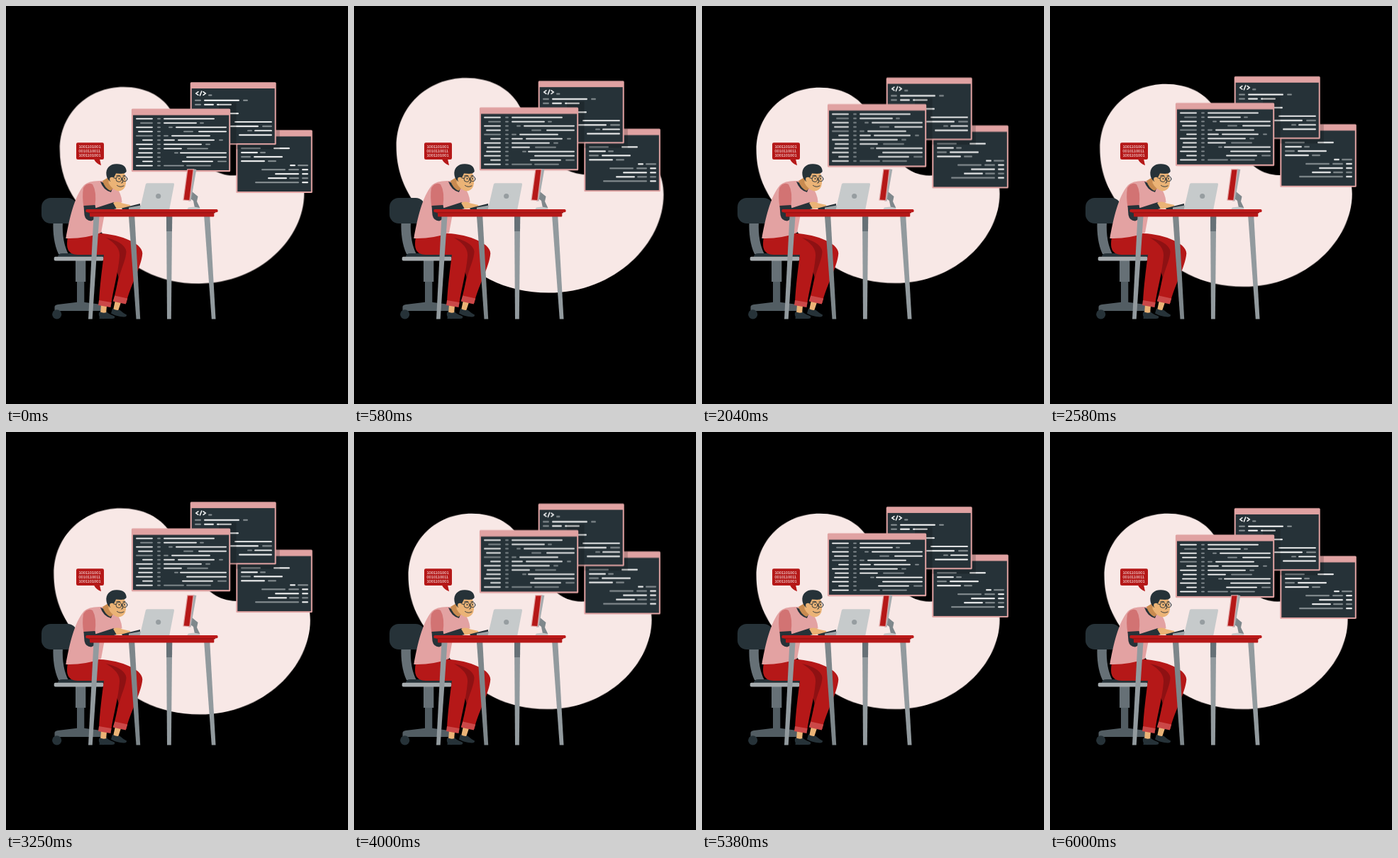
Write an HTML page without scripts that moves like this. It is 482x560 px and loops after 6040 ms.

```html
<!DOCTYPE html>
<html lang="en">
<head>
<meta charset="utf-8">
<title>Coder at a desk</title>
<style>
  html, body { margin: 0; width: 100%; height: 100%; overflow: hidden; background: #000; }
  svg { display: block; width: 482px; height: 560px; }

  .blob { fill: #f8e8e6; transform-origin: 248px 252.2px; animation: pulse 6.04s linear infinite; }
  .windows { animation: float 6.04s linear infinite; }

  .frame { fill: #e0a2a2; }
  .pane { fill: #263238; }
  .shade { fill: #000; opacity: .18; }
  .code { fill: none; stroke-width: 1.9; stroke-linecap: round; }
  .hi { stroke: #fff; }
  .lo { stroke: #8c9497; }

  .dark { fill: #263238; }
  .red { fill: #b51818; }
  .deep { fill: #8e1113; }
  .cuff { fill: #cb4848; }
  .shirt { fill: #e3a2a2; }
  .sleeve { fill: #d27373; }
  .skin { fill: #ebb376; }
  .steel { fill: #929a9e; }
  .iron { fill: #667076; }
  .line { fill: none; stroke: #263238; stroke-width: .9; stroke-linecap: round; }
  .bits { fill: #fff; font: 5.7px "Liberation Sans", Arial, sans-serif; }

  @keyframes float {
    0%, 100% { transform: translateY(0); }
    50% { transform: translateY(-9.64px); }
  }
  @keyframes pulse {
    0%, 100% { transform: scale(1.004); }
    9.8% { transform: scale(1.1); }
    29.5%, 38.6% { transform: scale(1); }
    50% { transform: scale(1.1); }
    58.3%, 93.6% { transform: scale(1); }
    96.4% { transform: scale(1.1); }
    99.3% { transform: scale(1); }
  }
</style>
</head>
<body>
<svg viewBox="0 0 482 560">
  <path class="blob" d="M76.5 202C76.5 152 116 114.6 166 114.6C196 114.6 219 127 231 145C256 185 274 238 320 238.5C348 239 360 215 385 217C410 220 419.5 240 419.5 264C419.5 326 358 390 272 390C215 390 172 366 142 327C114 291 76.5 262 76.5 202Z"/>

  <g class="windows">
    <!-- right window -->
    <rect class="frame" x="324.3" y="174.5" width="107.5" height="88.5" rx="1.5"/>
    <rect class="pane" x="326.3" y="183.5" width="103.5" height="77.5"/>
    <g class="code" transform="translate(0 200.2)">
      <path class="lo" d="M332 0h26M359 6h6M332 12h12M370 18h10M412 24h13M361 30h32M399 30h13M400 42h12M418 42h7M352 48h60"/>
      <path class="hi" d="M378 0h21M332 6h22M350 12h39M332 18h32M401 24h6M418 30h7M380 36h32M418 36h7M370 42h25M418 48h7"/>
    </g>
    <rect class="shade" x="324.3" y="174.5" width="61.5" height="27"/>

    <!-- top window -->
    <rect class="frame" x="259.7" y="107.2" width="121" height="88" rx="1.5"/>
    <rect class="pane" x="261.7" y="116" width="117" height="77.2"/>
    <path class="code hi" d="M271 120.7l-3.2 2.3 3.2 2.3M278 120.7l3.2 2.3-3.2 2.3M275.7 120l-2.3 6" style="stroke-width:1.5"/>
    <g class="code" transform="translate(0 132.7)">
      <path class="lo" d="M286-7.2h3.5M267 0h7M335 0h5M267 6h7M362 36.5h12M341 42.7h5"/>
      <path class="hi" d="M280 0h48M280 6h12M298 6h19M312 18.5h15M323 30.4h51M317 36.5h38M351 42.7h23M329 48.8h45"/>
    </g>
    <rect class="shade" x="300" y="136" width="24.5" height="59"/>

    <!-- front window -->
    <rect class="frame" x="176.9" y="144.6" width="139.3" height="88.6" rx="1.5"/>
    <rect class="pane" x="179" y="153.6" width="135.2" height="77.4"/>
    <g class="code" transform="translate(0 158.6)">
      <path class="lo" d="M190 6h16M274 6h4M230 12h4M251 18h12M184 24h22M223 24h5M301 30h4M282 36h5M256 42h28M238 48h4M299 60h11M223 66h27M255 66h33"/>
      <path class="lo" d="M214 0h3m-3 6h3m-3 6h3m-3 6h3m-3 6h3m-3 6h3m-3 6h3m-3 6h3m-3 6h3m-3 6h3m-3 6h3m-3 6h3"/>
      <path class="hi" d="M184 0h22M184 12h22M187 18h19M193 30h13M184 36h22M188 42h18M187 48h19M184 54h22M193 60h13M184 66h22"/>
      <path class="hi" d="M223 0h70M223 6h45M240 12h70M272 18h38M234 24h53M223 30h14M243 30h50M223 36h52M223 42h24M246 48h64M255 54h55M249 60h42"/>
    </g>
  </g>

  <!-- speech bubble -->
  <path class="red" d="M101.2 192.2h34.6q2.2 0 2.2 2.2v19.4q0 2.2-2.2 2.2h-3.6l1.8 8.2q-7-2.6-9.8-8.2h-23q-2.2 0-2.2-2.2v-19.4q0-2.2 2.2-2.2z"/>
  <g class="bits">
    <text x="102.4" y="200.4">1001101001</text>
    <text x="102.4" y="206.2">0010110011</text>
    <text x="102.4" y="212">1001101001</text>
  </g>

  <!-- chair -->
  <path class="iron" d="M66.5 304H80C79 322 82 338 88 349H74C68 336 66 320 66.5 304Z"/>
  <rect class="dark" x="50" y="270" width="50" height="36" rx="13"/>
  <rect class="iron" x="98" y="357" width="14.3" height="31"/>
  <rect x="100" y="388" width="10.3" height="31" fill="#525d63"/>
  <path d="M68.5 429V423Q69 420.5 73 420L100 416.7H110L134 420Q138 421 138 425V429Z" fill="#525d63"/>
  <circle class="dark" cx="71.7" cy="433.8" r="6.6"/>
  <circle class="dark" cx="137" cy="434" r="6.2"/>
  <path class="dark" d="M73 353Q73 348 80 348H134Q141 348 141 353Z"/>
  <rect x="67.7" y="352.8" width="70" height="5.8" rx="2" fill="#a6acaf"/>

  <!-- legs and shoes -->
  <path class="skin" d="M154 414L162 417L158 429L151 428ZM134 420L142 422L141 433H133Z"/>
  <path class="dark" d="M150 425.5Q155 429 160 427.5Q165 432 170 434.5Q170.500 437.500 166 437.500Q156 437 148 432.500ZM132.500 430.500Q137 432.500 142 431Q147 434.500 153 436.500Q154.500 440 149 440H131.500Z"/>
  <path class="red" d="M120 320C150 318 192 331 192.300 348C191 367 174 396 169.500 418L151.500 414C156 396 161 373 163 352Z"/>
  <path class="cuff" d="M153.300 407.500L171.300 411.500L168.700 419.500L150.700 415.500Z"/>
  <path class="deep" d="M118 323C145 324 169 333 169.500 346C169 356 163 368 159 383L150 350Z"/>
  <path class="red" d="M87 325C84 342 88 349.500 101 350H138C135 372 132 396 131 417L148 421C151 398 158 377 160 352C161 340 152 331 130 320Z"/>
  <path class="cuff" d="M131 414L148.500 417L147.500 424L130 421Z"/>

  <!-- torso and head -->
  <path class="shirt" d="M84.300 327C89 301 96 268 110 252Q117 245 136 246L154 253Q163 264 163.500 276L140 287L134 319Q110 328 84.300 327Z"/>
  <path class="dark" d="M133 247L151 254L148 262Q137 259 133 247Z"/>
  <path fill="#c98b50" d="M136 246L146 240L151 257L147 260Q139 256 136 246Z"/>
  <path class="skin" d="M145 233H166Q171 245 168 254Q165 260 158 260.500Q149 258 144.500 249Z"/>
  <path class="dark" d="M141.500 238C140 228 147 222 156 222.300C164 222 170 226 169.700 233C167 237 161 236 155 235.500C153 240 150 246 147 247Q142.500 244 141.500 238Z"/>
  <circle class="skin" cx="149.300" cy="244" r="3.200"/>
  <path class="line" d="M152 242L155 242.500M155.500 239Q158 237.500 161 238.800M165 238.800L168 238.500M164 243L164.500 248.500L162.500 249M156.500 252.500Q161 256 166 253"/>
  <g class="line">
    <circle cx="158.900" cy="243.500" r="3.900"/>
    <circle cx="167.400" cy="243.300" r="3.500"/>
  </g>
  <circle class="dark" cx="159.500" cy="243" r=".9"/>
  <circle class="dark" cx="167.200" cy="243" r=".9"/>

  <!-- arms -->
  <path class="dark" d="M124 285L152 276L156 285L140 289H124Z"/>
  <path class="skin" d="M151 277Q158 274 164 277.500L175 280Q176 283 170 284L156 285.500Z"/>
  <path class="sleeve" d="M109 256Q115 247 122 251Q128 261 125.500 281L109.500 283Q107 268 109 256Z"/>
  <path class="dark" d="M109.500 281L125.500 280L127 288Q128 300 120 302.500Q112 302 110.500 294Z"/>

  <!-- desk -->
  <g class="steel">
    <path d="M123.500 296H131.500L121.700 440.500H116Z"/>
    <path d="M173 296H181.300L189.200 440.500H183.500Z" fill="#7d868a"/>
    <path d="M226 296H234.200L232.800 440.500H227Z"/>
    <path d="M279.200 296H287.300L295.500 440.500H289.800Z"/>
  </g>
  <path class="iron" d="M226 296H234.200L234 317H226.200Z"/>
  <rect class="red" x="118" y="290" width="175.300" height="6.600" rx="1"/>
  <rect class="deep" x="116" y="289.700" width="179" height="1.600"/>
  <rect x="112.300" y="286" width="186.300" height="4.200" rx="1.800" fill="#bd1a1a"/>

  <!-- laptop -->
  <path class="dark" d="M163 284.500L189 278V286H164Z"/>
  <path fill="#9da4a7" d="M173 283.500L190 280.500V286H173Z"/>
  <path fill="#c6cacb" d="M199 249.300H235.500Q237.500 249.300 237 251.300L230.300 286H188.700L196.800 251Q197.300 249.300 199 249.300Z"/>
  <circle cx="214.700" cy="267.500" r="3.600" fill="#969da0"/>

  <!-- monitor -->
  <path fill="#7f888c" d="M262 261L270.500 268L269 275L273.300 284H266L264 274L260 271Z"/>
  <path fill="#c6cacb" d="M257 283.500L265 282.500L273.300 284V286H255.500Z"/>
  <path fill="#a6acaf" d="M264 229.300L268.300 230L260.500 274.500H257Z"/>
  <path fill="#e0a2a2" d="M255.300 229.300H264.800L259.300 274.300L249.300 273.500Z"/>
  <path class="red" d="M256.400 230.400H263.500L258.300 273L250.700 272.400Z"/>
</svg>
</body>
</html>
```
